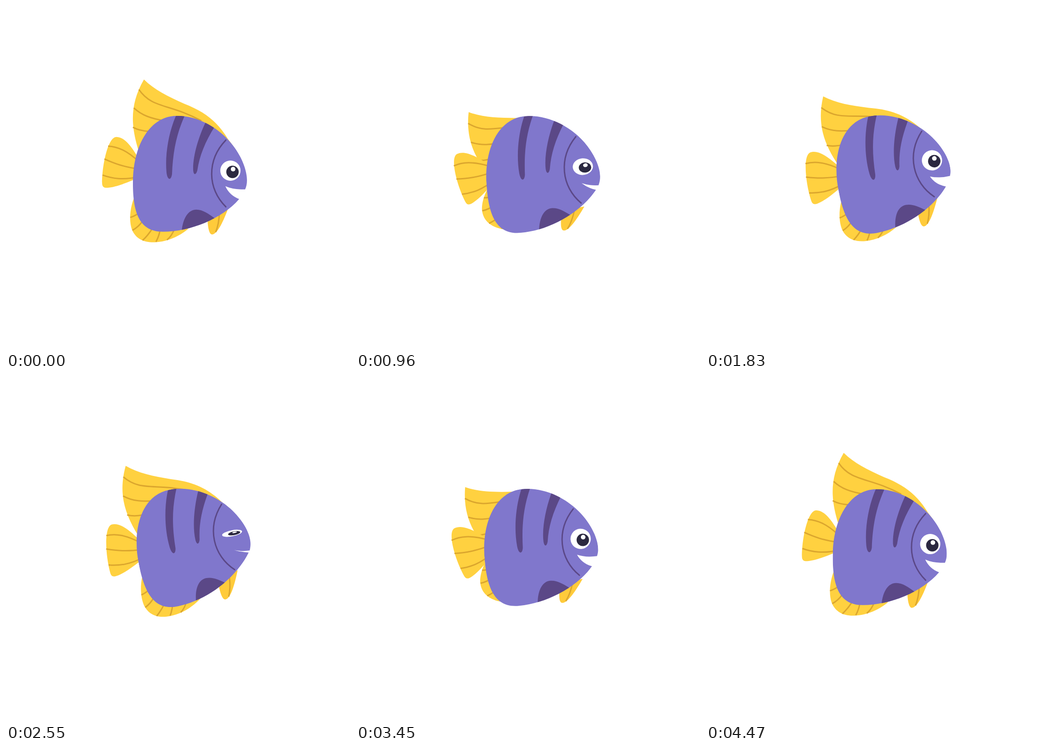
Write an HTML page that moves like this. It is 748 by 748 pixels and loops after 4500 ms.

```html
<!DOCTYPE html>
<html lang="en">
<head>
<meta charset="utf-8">
<title>Swimming fish</title>
<style>
  html, body { margin: 0; width: 100%; height: 100%; overflow: hidden; background: #fff; }
  svg { display: block; width: 100%; height: 100%; }
  .fin { fill: #ffd140; }
  .ray { fill: none; stroke: #dba62e; stroke-width: 3; }
  .dark { fill: #5b4887; }
</style>
</head>
<body>
<svg viewBox="0 0 748 748">
  <clipPath id="skin"><path id="outline"/></clipPath>
  <g id="fish">
    <g id="dorsal">
      <path class="fin" d="M288 314C272 262 268 215 300 160C322 182 352 197 388 213C432 230 460 252 483 290Q496 306 500 316Z"/>
      <path class="ray" d="M289 182C318 224 355 212 425 250M278 222C295 238 315 245 345 250M276 264Q290 272 312 273"/>
    </g>
    <g id="anal">
      <path class="fin" d="M284 405C270 432 266 465 274 487C284 510 305 515 324 514C352 513 378 500 396 485Z"/>
      <path class="ray" d="M270 460Q278 458 290 450M275 488Q288 481 297 468M297 510Q308 500 317 486M326 513Q332 503 335 488M350 509Q360 501 366 486"/>
    </g>
    <g id="tail">
      <path class="fin" d="M292 338C280 318 262 285 240 285C222 285 209 345 209 385C209 393 212 396 221 395.5C240 394 262 385 292 372Z"/>
      <path class="ray" d="M222 305C243 306 263 315 288 338M214 333C236 343 255 350 290 355M210 368C232 376 254 379 288 372"/>
    </g>
    <g id="pectoral">
      <path class="fin" d="M438 455C438 478 441 497 448 497C460 497 474 465 484 438Z" style="fill:#ffcb3b"/>
      <path class="ray" d="M464 450Q463 475 456 492"/>
    </g>
    <g clip-path="url(#skin)">
      <rect x="260" y="220" width="280" height="290" fill="#8077cc"/>
      <path class="dark" d="M371 236C356 268 345 318 349 362C351 380 359 380 361 366C363 318 370 280 389 238Z"/>
      <path class="dark" d="M435 251C420 282 406 325 407 357C408 369 413 368 416 358C421 325 433 296 454 262Z"/>
      <path class="dark" d="M382 490C385 460 397 443 414 443C428 443 440 452 454 462L440 495Z"/>
    </g>
    <path d="M478 292C436 336 438 398 478 437" fill="none" stroke="#5b4887" stroke-width="3" stroke-linecap="round"/>
    <g id="eye">
      <circle r="22" fill="#fff"/>
      <circle cx="4.5" cy="2.7" r="13.5" fill="#2b2840"/>
      <circle cx="5.8" cy="-3.2" r="5" fill="#fff"/>
    </g>
  </g>
</svg>
<script>
const LOOP = 4500;
const el = id => document.getElementById(id);
const mix = (a, b, k) => a + (b - a) * k;
const smooth = u => u * u * (3 - 2 * u);
const swing = (t, period) => (1 - Math.cos(2 * Math.PI * t / period)) / 2;
const wave = (t, cycles, phase) => Math.sin(2 * Math.PI * cycles * t / LOOP + phase);

// Body outline with the mouth between shut (0) and open (1)
function outline(open) {
  const p = (x0, y0, x1, y1) => mix(x0, x1, open) + " " + mix(y0, y1, open);
  const upper = p(518, 403, 520, 399), lower = p(516, 405, 507, 420), corner = p(486, 395.5, 477, 392);
  return `M${upper}C525 388 526 374 519 351C511 327 498 307 482 290C452 259 412 239 372 239` +
    `C312 239 276 305 276 384C276 438 284 492 342 491C400 491 ${p(474, 460, 470, 463)} ${lower}` +
    `Q${p(502, 402, 486, 412)} ${corner}Q${p(502, 402, 495, 400)} ${upper}Z`;
}

function move(id, transform) {
  el(id).setAttribute("transform", transform);
}

function draw() {
  const t = performance.now() % LOOP;

  // Slow tilt plus a loose drift that sinks a little over the loop
  const x = 379.6 + 4 * wave(t, 1, -0.84) + 1.5 * wave(t, 2, -0.72) + 2.1 * wave(t, 4, -0.91);
  const y = 372.5 + 3 * t / LOOP + 1.1 * wave(t, 2, 2.74) + 1.2 * wave(t, 3, -2.33) + 1.7 * wave(t, 4, 1.18);
  move("fish", `translate(${x} ${y}) rotate(${-11.8 * swing(t, LOOP)}) translate(-374 -374)`);

  const flap = swing(t, LOOP / 2);
  move("dorsal", `rotate(${-20.4 * flap} 452 337)`);
  move("tail", `rotate(${-23.5 * flap} 290 354)`);
  move("anal", `rotate(${22.5 * flap} 405 429)`);
  move("pectoral", `rotate(${15 * flap} 456 443)`);

  // The mouth rests open for half of each bite
  const bite = t % 1500;
  el("outline").setAttribute("d", outline(bite < 750 ? 1 : 1 - swing(bite, 750)));

  const fromBlink = Math.abs((t + 973) % 1382 - 691);
  move("eye", `translate(488 358.4) scale(1 ${smooth(Math.min(1, fromBlink / 190))})`);

  requestAnimationFrame(draw);
}
draw();
</script>
</body>
</html>
```
